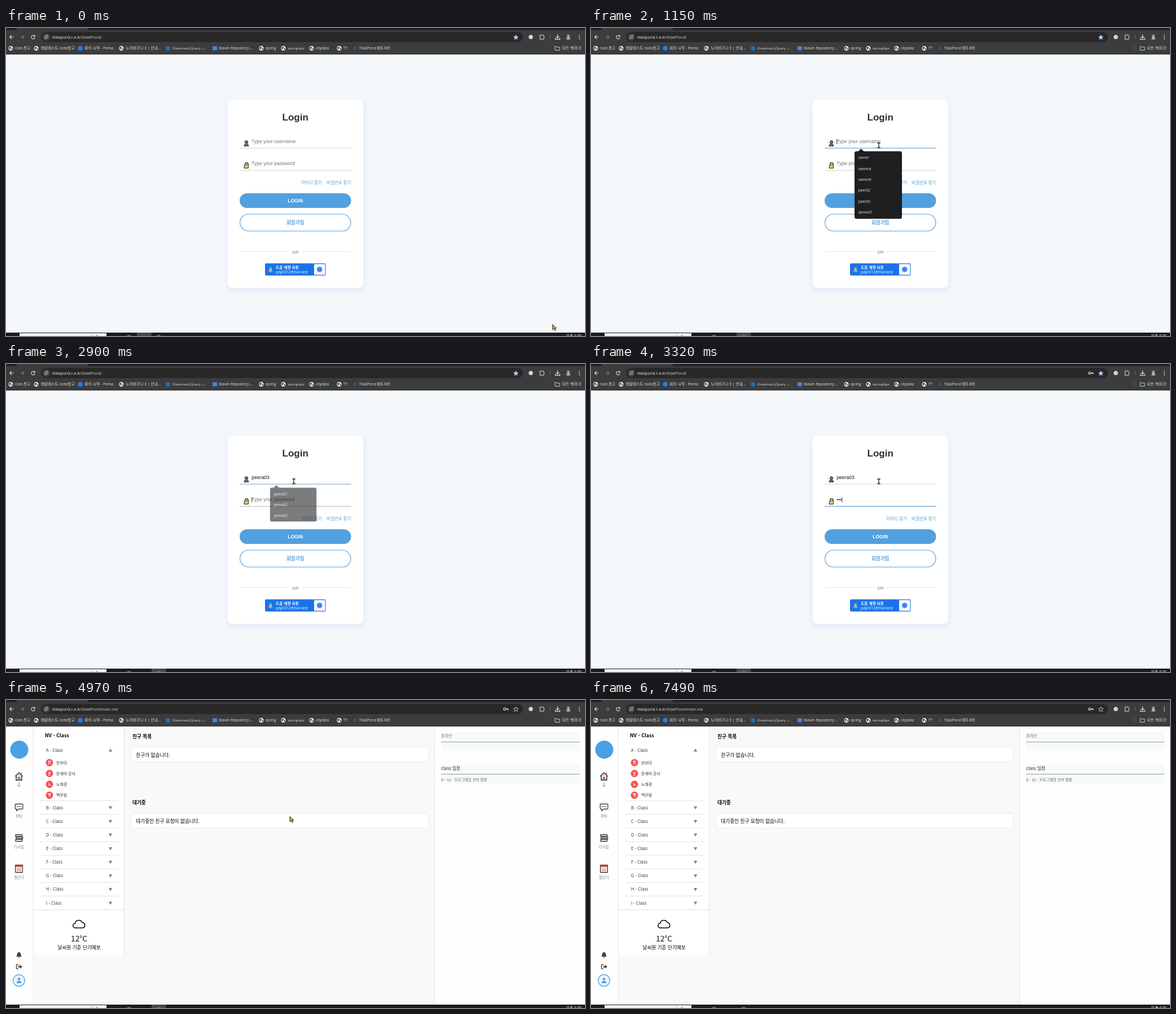
An HTML page that plays this animation: 1026 px wide and 546 px high, repeating every 7560 ms.

```html
<!DOCTYPE html>
<html lang="ko">
<head>
<meta charset="utf-8">
<title>Login flow</title>
<style>
  html, body { margin: 0; width: 100%; height: 100%; overflow: hidden; }
  svg { display: block; font-family: 'Open Sans', 'Noto Sans CJK KR', sans-serif; }
  .arial { font-family: 'Liberation Sans', 'Noto Sans CJK KR', Arial, sans-serif; }
  .noto { font-family: 'Noto Sans CJK KR', 'Noto Sans CJK', sans-serif; }
  .mid { text-anchor: middle; }
  .bold { font-weight: 700; }
  .medium { font-weight: 500; }
</style>
</head>
<body>
<svg id="stage" width="1026" height="546" viewBox="0 0 1026 546"></svg>
<script>
const LOOP = 7560, BLUE = '#52a0de';

// Markup helpers
const text = (x, y, s, size, fill, cls = '') =>
  `<text x="${x}" y="${y}" font-size="${size}" fill="${fill}" class="${cls}">${s}</text>`;
const rect = (x, y, w, h, fill, r = 0, more = '') =>
  `<rect x="${x}" y="${y}" width="${w}" height="${h}" rx="${r}" fill="${fill}" ${more}/>`;
const circle = (x, y, r, fill, more = '') => `<circle cx="${x}" cy="${y}" r="${r}" fill="${fill}" ${more}/>`;
const path = (d, stroke, width = 1, fill = 'none', more = '') =>
  `<path d="${d}" stroke="${stroke}" stroke-width="${width}" fill="${fill}" ${more}/>`;
const fillPath = (d, fill) => path(d, 'none', 0, fill);
const group = (id, ...parts) => `<g id="${id}">${parts.join('')}</g>`;
const at = (x, y, ...parts) => `<g transform="translate(${x} ${y})">${parts.join('')}</g>`;

const STAR = 'M0-4.8 1.4-1.6 4.8-1.3 2.2 1 3 4.4 0 2.6-3 4.4-2.2 1-4.8-1.3-1.4-1.6Z';
const ICON = '#dfe1e3';

const globe = x => at(x, 36, circle(0, 0, 4.2, '#e2e2e2'),
  fillPath('M-3.2-1.5 0-2.8.6-.6-1.3.2-1 2.6-2.6 1ZM1.4.2 3.3-.6 2.8 1.8 1 3Z', '#3c3c3c'));
const portrait = (x, y) => at(x, y,
  rect(-2.6, -4.5, 5.2, 3, '#4f9be0', 1), rect(-2.2, -1.5, 4.4, 3, '#e0c49c', 1), rect(-3.4, 1.3, 6.8, 3.2, '#a9a9b0', 1));

function browser() {
  const bookmarks = [
    [16, 'note.창고'], [61, '개발테스트 note창고', 6.9], [139, '회의 시작 - Pemo', 6.9],
    [212, '누리바구니 3 | 안내...', 6.8], [295, 'Download jQuery |...', 6.15], [377, 'Maven Repository:...'],
    [460, 'spring'], [499, 'springAjax', 6.15], [549, 'citydata'], [598, 'TT'], [626, 'TidalPond 배포서버']];
  const marks = {
    139: circle(131.5, 36, 4.4, '#1f7cf0'), 295: circle(287, 36, 4, '#1d6fb5'),
    377: rect(366, 32.5, 8, 7, '#3f86e6'), 626: circle(618.5, 36, 3, '#454c66') };
  return [
    rect(0, 0, 1026, 4, '#1f2020'), rect(19, -6, 126, 16, '#3c3c3c', 4), rect(0, 3.5, 1026, 43.5, '#3c3c3c'),
    rect(62, 7, 854, 18, '#282828', 9),
    path('M13.5 16H6.8M10 12.6 6.6 16 10 19.4', ICON, 1.1),
    path('M25 16h6.7M28.5 12.6 31.9 16l-3.4 3.4', '#7c7c7c', 1.1),
    group('reload', path('M50.7 14.3A3.2 3.2 0 1 0 51.2 17', ICON, 1.1), fillPath('M51.6 12v3.4h-3.4Z', ICON)),
    group('stop', path('M45.3 13.3l5.4 5.4M50.7 13.3l-5.4 5.4', ICON, 1.1)),
    circle(71.5, 16, 6.4, '#454545'),
    path('M68.5 14.2h3M71.5 17.8h3', ICON, .9), circle(73.2, 14.2, 1.1, 'none', `stroke="${ICON}" stroke-width=".8"`),
    circle(69.8, 17.8, 1.1, 'none', `stroke="${ICON}" stroke-width=".8"`),
    `<text x="82" y="18.7" font-size="7.05" fill="#f2f2f2">tidalpond.r-e.kr<tspan id="route" fill="#d0d0d0"></tspan></text>`,
    group('key', at(886, 16, circle(-2.4, 0, 2, 'none', `stroke="${ICON}" stroke-width="1.1"`),
      path('M-.3 0H4.5M3.4 0v2.2', ICON, 1.3))),
    group('starOn', at(903.5, 16.3, fillPath(STAR, '#a8d0fa'))),
    group('starOff', at(903.5, 16.3, path(STAR, ICON, .9, 'none', 'transform="scale(.9)"'))),
    circle(930, 16, 3.8, '#d5d5d5'),
    path('M946 13h2.2a1.2 1.2 0 0 1 2.4 0h2.2v2.4a1.2 1.2 0 0 1 0 2.4v2.2H946v-2.3a1.1 1.1 0 0 0 0-2.3Z', ICON, 1),
    rect(963.5, 12, .8, 8, '#6a6a6a'),
    path('M977.5 11.5v6M974.7 15l2.8 2.8 2.8-2.8M973.5 17.5v2.6h8v-2.6', ICON, 1.1),
    portrait(996.5, 16), ...[12.7, 16, 19.3].map(y => circle(1016, y, .9, ICON)),
    ...bookmarks.map(([x, s, size = 6.35]) => (marks[x] || globe(x - 7.5)) + text(x, 38.3, s, size, '#e4e4e4')),
    rect(963, 32, .8, 8, '#6a6a6a'), path('M973 32.8h3l1 1.2h4v5.3h-8Z', ICON, .9),
    text(985, 38.4, '모든 북마크', 7.1, '#e4e4e4')
  ].join('');
}

function taskbar() {
  return [
    rect(0, 540, 1026, 6, '#1a1c1f'), rect(24, 541, 154, 5, '#f2f2f2'),
    circle(152.5, 547, 2, '#d8a94c'), circle(161, 546.5, 1.8, '#6b7686'),
    `<rect id="activeTask" y="540" width="25.5" height="6" fill="#47494b"/>`,
    circle(218, 550, 6, '#9a5a55'), circle(270.5, 550, 6, '#9a5a55'),
    group('clockHover', rect(985, 540, 41, 6, '#2e3033')), text(992.5, 548.3, '오후 4:30', 6.7, '#fff')
  ].join('');
}

function loginPage() {
  const line = (y, color, id = '') => `<rect id="${id}" x="414" y="${y}" width="197.5" height="1" fill="${color}"/>`;
  return [
    rect(0, 47, 1026, 493, '#f4f8fb'),
    rect(392.5, 127.5, 240.5, 333, '#fff', 8, 'filter="url(#shadow)"'),
    text(512.7, 164.4, 'Login', 17.05, '#2e2e33', 'arial bold mid'),
    circle(426, 202.4, 2.7, '#777', 'stroke="#222" stroke-width="1"'),
    path('M421.8 209.2q.2-3.4 4.2-3.4t4 3.4Z', '#222', 1, '#777'),
    path('M423.9 243v-1.8a2.5 2.5 0 0 1 5 0v1.8', '#222', 1.3),
    path('M422.7 242h7.2l-.5 6.5h-7.6Z', '#222', .9, '#e5c044'),
    line(212.5, '#d2d2d2'), line(212.5, BLUE, 'userLine'), line(251.8, '#d2d2d2'), line(251.8, BLUE, 'passLine'),
    `<text id="user" class="arial" x="435.3" y="204.3" font-size="8.55"></text>`,
    `<text id="pass" class="arial" x="435.3" y="243.4" font-size="8.55" fill="#757575">Type your password</text>`,
    '<g id="dots"></g>',
    `<rect id="caret" width=".8" height="9" fill="#111"/>`,
    text(523, 277.2, '아이디 찾기', 7.6, BLUE), text(568, 277.2, '비밀번호 찾기', 7.5, BLUE),
    rect(414, 293, 197.5, 26, BLUE, 13), text(512.7, 308.6, 'LOGIN', 8.55, '#fff', 'arial bold mid'),
    rect(414.6, 330, 196.3, 30, '#fff', 15, `stroke="${BLUE}" stroke-width="1.2"`),
    text(512.7, 348.3, '회원가입', 8.55, BLUE, 'arial bold mid'),
    rect(414, 396.2, 88, .8, '#ddd'), rect(523.5, 396.2, 88, .8, '#ddd'),
    text(512.7, 399.5, 'OR', 7.5, '#777', 'arial mid'),
    rect(459, 417.3, 107.5, 21.4, '#1a73e8', 2), rect(546, 418.4, 19.4, 19.2, '#fff', 1.2),
    circle(555.7, 428, 4.8, '#4285f4'), portrait(468.7, 428),
    text(478, 427.3, '도윤 계정 사용', 6.75, '#fff', 'bold'), text(478, 434.7, 'pdy0312@mail.test', 6.4, '#fff'),
    '<g id="popup"></g>'
  ].join('');
}

function mainPage() {
  const people = ['한보미', '문세아 강사', '노태경', '백우림'];
  const rail = [['홈', 153.2], ['채팅', 208], ['티서랍', 262.7], ['캘린더', 317.3]];
  const card = (y, title, body) => text(224, y, title, 8.65, '#000', 'noto bold') +
    rect(221.5, y + 16.3, 527, 26.2, '#fff', 3, 'stroke="#e6e6e6" stroke-width=".8"') +
    text(230.3, y + 33, body, 8.65, '#000', 'noto');
  return [
    rect(0, 47, 1026, 493, '#f9f9f9'), rect(0, 47, 48.5, 493, '#fefefe'), rect(48.3, 47, .8, 493, '#ddd'),
    rect(49, 47, 160.5, 405, '#fff'), rect(49, 452, 160.5, 88, '#f8faf9'), rect(209.3, 47, .8, 405, '#ddd'),
    rect(760, 47, 266, 493, '#fefefe'), rect(759.3, 47, .8, 493, '#ddd'),
    // Side rail
    circle(23.5, 88, 16, '#4b9fe3'),
    ...rail.map(([s, y]) => text(23, y, s, 6.5, '#888', 'noto mid')),
    path('M16.5 135.3 23 128.8l6.5 6.5M18 134.5V142h10v-7.5', '#222', 1.3, '#e6d3c6'),
    rect(21.5, 136.5, 3.2, 5.5, '#3e7fc4'), rect(26.2, 128.6, 2, 4, '#d9573f'),
    path('M17.5 184.3h11.2q1.2 0 1.2 1.2v6.6q0 1.2-1.2 1.2H22l-3 3v-3h-1.5q-1.2 0-1.2-1.2v-6.6q0-1.2 1.2-1.2Z', '#222', 1.2),
    ...[20, 23, 26].map(x => circle(x, 188.8, .9, '#222')),
    ...['#8fc3e8', '#f0a05c', '#cfe4f2'].map((c, i) =>
      rect(16.8 + i % 2, 238.5 + i * 4.2, 12, 3.7, c, 1, 'stroke="#222" stroke-width="1.1"')),
    rect(16.6, 292.6, 12.8, 13, '#f4eee6', .5, 'stroke="#222" stroke-width="1.1"'), rect(17.1, 293.1, 11.8, 3, '#e0563c'),
    ...[0, 1, 2, 3, 4, 5].map(i => rect(19 + i % 3 * 3, 298.5 + (i > 2) * 3, 1.9, 1.8, '#a58f84')),
    fillPath('M18.2 455q1.5-1.5 1.5-4 0-3.5 3.3-4 3.3.5 3.3 4 0 2.5 1.5 4ZM21.6 455.7h2.8q-.2 1.5-1.4 1.5t-1.4-1.5Z', '#444'),
    path('M22 469H19.5q-1 0-1 1v5.5q0 1 1 1H22', '#444', 1.4),
    fillPath('M21.5 471.5h3.2V469l4 3.8-4 3.8v-2.5h-3.2Z', '#444'),
    circle(23, 497.2, 10.3, '#e9f4fd', 'stroke="#4b9fe3" stroke-width="1.2"'),
    circle(23, 494.6, 2.2, '#3b94e0'), fillPath('M18.8 501.7q0-3.8 4.2-3.8t4.2 3.8Z', '#3b94e0'),
    // Class list
    text(69, 66.4, 'NV - Class', 8.8, '#000', 'noto bold'),
    text(71, 92.2, 'A - Class', 7.5, '#333', 'noto'), fillPath('M181.8 91.5h6.6l-3.3-5.6Z', '#858585'),
    ...people.map((name, i) => circle(77, 111 + i * 19.25, 6.4, '#fb4c4c') +
      text(77, 113.4 + i * 19.25, name[0], 6.5, '#fff', 'noto bold mid') +
      text(89, 113.5 + i * 19.25, name, 6.95, '#333', 'noto')),
    ...[...'BCDEFGHI'].map((c, i) => {
      const y = 178.3 + i * 24.13;
      return rect(60, y, 139.5, .8, '#ddd') + text(71, y + 15.3, c + ' - Class', 7.5, '#333', 'noto') +
        fillPath(`M181.8 ${y + 10.2}h6.6l-3.3 5.6Z`, '#858585');
    }),
    rect(49, 371.6, 160.5, .9, '#ddd'),
    group('weather',
      path('M123 404a4 4 0 0 1-.5-8 6.6 6.6 0 0 1 12.6-1.5 4.8 4.8 0 0 1 .7 9.5Z', '#000', 1.5),
      text(129.6, 427.8, '12°C', 13.7, '#111', 'noto mid'),
      text(129.6, 441.6, '날씨원 기준 단기예보', 8.65, '#000', 'noto mid')),
    card(67.7, '친구 목록', '친구가 없습니다.'), card(184.7, '대기중', '대기중인 친구 요청이 없습니다.'),
    // Right column
    rect(771, 57, 245.5, 32, '#f8f9f9', 2), rect(771, 74, 245.5, 1, '#86a198'),
    text(771, 66.4, '온라인', 7.1, '#666', 'noto'),
    rect(771, 114, 245.5, 35.5, '#f8f9f9', 2), rect(771, 131, 245.5, 1, '#86a198'),
    text(771, 123.9, 'class 일정', 7.7, '#222', 'noto medium'),
    text(771, 143.7, 'D - 62 : 프로그래밍 언어 활용', 6.6, '#666', 'noto')
  ].join('');
}

document.getElementById('stage').innerHTML = `
  <filter id="shadow" x="-20%" y="-20%" width="140%" height="140%">
    <feDropShadow dx="0" dy="4" stdDeviation="6" flood-color="#4a90d0" flood-opacity=".17"/>
  </filter>` +
  group('login', loginPage()) + group('main', mainPage()) + browser() + taskbar() +
  group('arrow', path('M0 0V9.3L2.3 7.3 4 10.7 5.5 10 3.9 6.8H7Z', '#222', .9, 'inherit')) +
  group('beam', path('M-2.7-4.3h5.4M0-4.3v8.6M-2.7 4.3h5.4', '#26281c', 1.5), path('M0-2.5v4', '#8f9a30', .8));

const el = {};
document.querySelectorAll('[id]').forEach(node => el[node.id] = node);

// Timeline helpers
const ramp = (t, from, to) => Math.min(1, Math.max(0, (t - from) / (to - from)));
const show = (node, on) => node.style.display = on ? '' : 'none';
const count = (times, t) => times.filter(time => t >= time).length;

const USER = 'peera03';
const userKeys = [1680, 1740, 1810, 2010, 2230, 2410, 2480];
const passKeys = [3170, 3250, 3320, 3510, 3580, 3580, 3770, 3920, 4100];
const lists = [
  ['owner', 'ownera', 'ownerb', 'peer02', 'peer03', 'demo01'],
  ['peer02', 'peer03', 'peera01', 'peera02', 'peera03', 'peerb01'],
  ['peera01', 'peera02', 'peera03']];

// Pointer moves: start time, number of 68 ms steps, end point
const moves = [[70, 11, 510, 208], [4440, 1, 509.5, 207], [4910, 1, 503, 206.5], [5040, 11, 708, 331],
  [5790, 1, 721, 331], [5860, 1, 711.5, 343], [6200, 12, 1003, 537], [7020, 3, 1001, 541]];

function pointer(t) {
  let x = 968.5, y = 525.5;
  for (const [start, steps, toX, toY] of moves) {
    if (t < start) break;
    const k = Math.min(1, (Math.floor((t - start) / 68) + 1) / steps);
    const e = k * k * (3 - 2 * k);
    x += (toX - x) * e;
    y += (toY - y) * e;
  }
  return [x, y];
}

let shownList = -1;
function drawPopup(typed, t) {
  const index = typed < 1 ? 0 : typed < 5 ? 1 : 2;
  if (index !== shownList) {
    const rows = lists[index];
    el.popup.innerHTML = fillPath('M473 219l5.5-5 5.5 5Z', '#1f1f1f') +
      rect(467, 218.5, 84, rows.length * 19.4 + 3.3, '#1f1f1f', 3.5) +
      rows.map((s, i) => text(473.7, 232.4 + i * 19.35, s, 6.5, '#e8e8e8')).join('');
    shownList = index;
  }
  const alpha = ramp(t, 890, 1150) * (1 - ramp(t, 2830, 3000));
  const scale = .95 + .05 * alpha;
  el.popup.setAttribute('opacity', alpha);
  el.popup.setAttribute('transform', `translate(509 250) scale(${scale}) translate(-509 -250)`);
}

function drawForm(t) {
  const typed = count(userKeys, t), dots = count(passKeys, t), onPass = t >= 2830;
  el.user.textContent = typed ? USER.slice(0, typed) : 'Type your username';
  el.user.setAttribute('fill', typed ? '#111' : '#757575');
  show(el.pass, !dots);
  el.dots.innerHTML = Array.from({ length: dots }, (_, i) => circle(436.9 + i * 3.03, 240.4, 1.15, '#111')).join('');
  el.userLine.setAttribute('opacity', ramp(t, 890, 1190) - ramp(t, 2830, 3030));
  el.passLine.setAttribute('opacity', ramp(t, 2830, 3030));
  show(el.caret, (t >= 890 && t < 1480) || t >= 1680);
  el.caret.setAttribute('x', 435.3 + (onPass ? dots * 3.03 : typed && el.user.getComputedTextLength()));
  el.caret.setAttribute('y', onPass ? 236 : 197);
  drawPopup(typed, t);
}

function draw(t) {
  const onMain = t >= 4580, loading = t >= 4300 && t < 4640, typing = t >= 680 && t < 4440;
  show(el.login, !onMain);
  show(el.main, onMain);
  if (!onMain) drawForm(t);
  show(el.weather, t >= 4970);
  show(el.reload, !loading);
  show(el.stop, loading);
  show(el.key, t >= 3170);
  show(el.starOn, !onMain);
  show(el.starOff, onMain);
  show(el.clockHover, t >= 7020 && t < 7490);
  el.route.textContent = onMain ? '/tidalPond/main.me' : '/tidalPond/';
  el.activeTask.setAttribute('x', t < 890 ? 232 : 258);
  show(el.activeTask, t < 7490);

  const moving = t < 750 || (t > 4900 && t < 5790) || (t >= 6200 && t < 7000);
  show(el.beam, typing);
  show(el.arrow, !typing);
  el.arrow.firstChild.setAttribute('fill', moving ? '#d9a440' : '#d2e01c');
  const place = `translate(${pointer(t).join(' ')})`;
  el.arrow.setAttribute('transform', place);
  el.beam.setAttribute('transform', place);
}

const begin = performance.now();
function tick() {
  draw((performance.now() - begin) % LOOP);
  requestAnimationFrame(tick);
}
tick();
</script>
</body>
</html>
```
